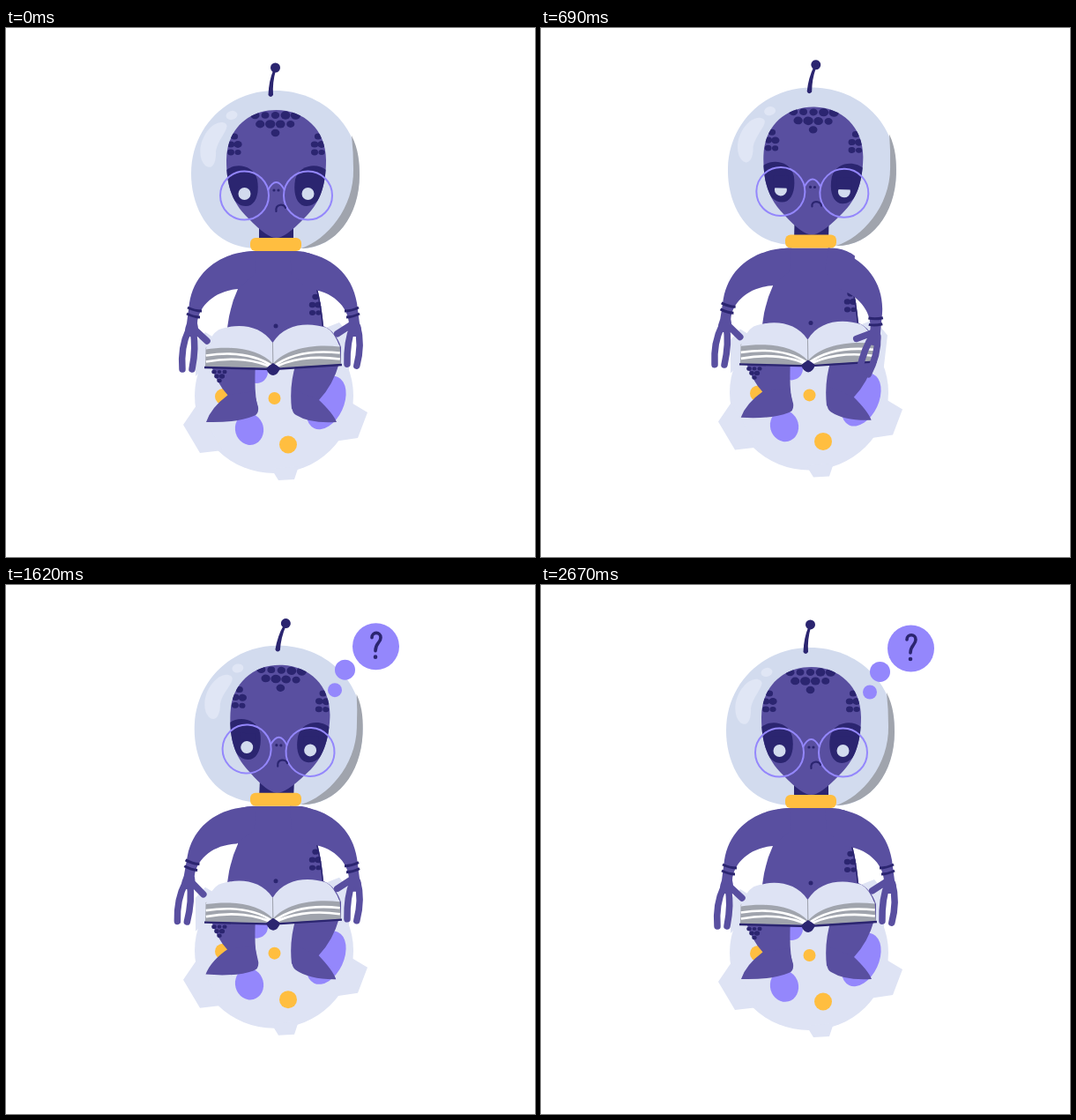
Animation, 600 px wide and 600 px high, one loop 2.7 s. Source, as an HTML page:

```html
<!DOCTYPE html>
<html>
<head>
<meta charset="utf-8">
<style>
  html, body { margin: 0; height: 100%; overflow: hidden; background: #fff; }
  svg { display: block; width: 100vw; height: 100vh; }
  .skin { fill: #594fa0; }
  .dark { fill: #2b2570; }
  .pale { fill: #dee3f4; }
  .glass { fill: #d2dbee; }
  .gray { fill: #a0a4ad; }
  .violet { fill: #9487fc; }
  .gold { fill: #ffbe40; }
  .line { fill: none; stroke: #2b2570; stroke-width: 3; }
  .round { stroke-linecap: round; }
  .finger { fill: none; stroke: #594fa0; stroke-width: 7.5; stroke-linecap: round; }
  .rim { fill: none; stroke: #9487fc; stroke-width: 2; }
  .sheets { fill: none; stroke: #fff; stroke-width: 2.6; }
</style>
</head>
<body>
<svg viewBox="0 0 600 600">
  <defs>
    <path id="skull" d="M250 150C250 115 275 93 306.500 93S363 115 363 150C363 181 355 200 338 216Q317 238 306.500 238T275 216C258 200 250 181 250 150"/>
    <path id="trunk" d="M280 253H330Q344 253 356 262L353 295Q358 315 360 338Q374 344 380 362V380H228V368Q231 350 251 340Q254 315 263 296L252 262Q262 254 280 253"/>
    <clipPath id="inSkull"><use href="#skull"/></clipPath>
    <clipPath id="inTrunk"><use href="#trunk"/></clipPath>
    <filter id="blur" x="-30%" y="-30%" width="160%" height="160%"><feGaussianBlur stdDeviation="2"/></filter>
  </defs>
  <g id="all">
    <g class="pale">
      <ellipse cx="304" cy="417" rx="90" ry="88"/>
      <path d="M216 428L201 450L220 482L246 479ZM390 424L410 436L399 465L372 469ZM301 500L309 513L327 512L332 497Z"/>
      <path d="M215 395V357L226 345L250 360ZM350 345L378 334L393 352L388 395Z"/>
    </g>
    <g class="violet">
      <ellipse cx="363" cy="425" rx="20" ry="32" transform="rotate(25 363 425)"/>
      <ellipse cx="276" cy="455" rx="16" ry="18" transform="rotate(-15 276 455)"/>
      <circle cx="284" cy="390" r="13"/>
    </g>
    <g class="gold">
      <circle cx="304.500" cy="420" r="7"/>
      <circle cx="320" cy="472.500" r="10"/>
      <circle cx="246" cy="418" r="9"/>
    </g>

    <g class="skin">
      <path d="M232 380Q238 402 252 417L262 432H286Q281 415 283 380ZM329 380Q321 405 324 432L350 430L355 422Q371 405 378 380Z"/>
      <path id="footL" d="M252 416Q232 431 227 447Q262 448 281 440Q287 438 286 430L281 412Z"/>
      <path id="footR" d="M354 421Q371 437 375 447Q345 449 329 439Q325 437 324 430L326 410Z"/>
    </g>
    <g class="dark" id="thighSpots"></g>

    <g id="head">
      <path class="glass" d="M305 71C360 71 401 112 401 165C401 210 375 250 335 250H285C235 250 210 208 210 165C210 112 252 71 305 71"/>
      <path class="gray" d="M392 122C400 138 401 153 401 167C401 212 375 249 335 250C364 240 395 204 394 160Q394 140 392 122"/>
      <path fill="#e0e6f5" d="M222 150C215 130 232 105 246 107C259 110 240 125 238 140C239 160 228 163 222 150"/>
      <ellipse cx="256" cy="99" rx="6.500" ry="5" fill="#e0e6f5" transform="rotate(-15 256 99)"/>
      <g id="antenna" class="dark">
        <path d="M297.500 76Q298 60 303.500 47L306 48Q302 62 303 76Q300 80 297.500 76"/>
        <circle cx="305.500" cy="45" r="5.500"/>
      </g>
      <path class="dark" d="M287 222H326V242H287Z"/>
      <use href="#skull" class="skin"/>
      <g class="dark" clip-path="url(#inSkull)" id="headSpots"></g>
      <g id="eye">
        <path class="dark" clip-path="url(#inSkull)" d="M248 163C256 153 280 153 285 172C288 190 282 202 272 202C260 202 250 187 248 163"/>
        <circle class="glass" cx="270.500" cy="188" r="7"/>
        <rect class="dark" id="lid" x="262" y="172" width="17"/>
        <circle class="dark" cx="304" cy="184" r="1.600"/>
        <circle class="rim" cx="270.500" cy="190" r="27.500"/>
      </g>
      <use href="#eye" transform="matrix(-1 0 0 1 613 0)"/>
      <path class="rim" d="M297 184Q306.500 166 316 184"/>
      <path id="mouth" class="line round" style="stroke-width:2.200"/>
    </g>

    <use href="#trunk" class="skin"/>
    <g class="dark" clip-path="url(#inTrunk)">
      <g id="sideSpots"></g>
      <path class="line" d="M353 295Q358 315 360 338"/>
    </g>
    <circle class="dark" cx="306" cy="338" r="2.500"/>
    <rect class="gold" x="277" y="238" width="58" height="15" rx="6"/>

    <path id="page" class="pale" filter="url(#blur)" d="M286 356Q290 328 314 299Q334 301 348 310Q331 330 328 356Z"/>

    <g transform="rotate(-1.100 303 385)">
      <g id="halfBook">
        <path class="gray" d="M227 361Q265 350 303 370V386L226 383Z"/>
        <path class="sheets" id="sheets"/>
        <path class="pale" d="M227 363Q233 346 242 341C262 334 289 335 303 357V381C288 364 258 359 227 363"/>
        <path class="line" style="stroke-width:2.400" d="M225 383.500L303 387"/>
      </g>
      <use href="#halfBook" transform="matrix(-1 0 0 1 606 0)"/>
      <path d="M303 357V383" stroke="#a0a4ad"/>
      <path class="dark" d="M303 380Q308 383 311 386Q308 394 303 394T295 386Q298 383 303 380"/>
    </g>

    <g id="armL">
      <g id="limb">
        <path class="skin" d="M284 253C246 253 214 274 208 312L205 335Q202 342 203 350H217Q219 343 217 335C218 316 236 298 263 296L282 280Z"/>
        <path class="line" d="M206 317Q214 321 222 321M205 324Q213 328 220 328"/>
      </g>
      <path id="hand" class="finger" d="M207 343Q198 362 200 387M212 343Q216 362 211 387M214 342L228 355"/>
    </g>
    <g id="armR">
      <use href="#limb" transform="matrix(-1 0 0 1 606 0)"/>
      <use href="#hand" transform="translate(0 -5) rotate(10 396 335) matrix(-1 0 0 1 607 0)"/>
    </g>

    <g class="violet">
      <circle id="dotS" cx="373" cy="121.500" r="8"/>
      <circle id="dotM" cx="384.500" cy="98.500" r="11.500"/>
      <g id="dotL">
        <circle cx="419.500" cy="72" r="26.500"/>
        <path class="line round" style="stroke-width:3.600" d="M415 62C415 55 425 55 425 62C425 68 419 68 419 77"/>
        <circle class="dark" cx="419" cy="84" r="2.300"/>
      </g>
    </g>
  </g>
</svg>
<script>
const LOOP = 2700;
const $ = id => document.getElementById(id);

// Centred rows of spots with slightly varied sizes.
function cluster(id, x, y, rows, gap, rise, size) {
  rows.forEach((count, row) => {
    for (let i = 0; i < count; i++) {
      const r = size * (0.92 + 0.12 * Math.sin(5 * i + 3 * row));
      const cx = x + (i - (count - 1) / 2) * gap;
      $(id).innerHTML += `<ellipse cx="${cx}" cy="${y + row * rise}" rx="${r}" ry="${r * 0.85}"/>`;
    }
  });
}
cluster('headSpots', 305.5, 99, [5, 4, 1], 11.5, 10, 5.5);
for (const side of [-1, 1]) cluster('headSpots', 306.5 + side * 47.5, 123, [1, 2, 2], 8, 9, 4.5);
cluster('sideSpots', 351, 305, [1, 2, 2], 7, 9, 4);
cluster('thighSpots', 242, 390, [3, 2, 1], 6, 5, 3);

$('sheets').setAttribute('d', [0, 1].map(i =>
  `M227 ${370 + 7 * i}C258 ${366 + 6 * i} 285 ${371 + 5 * i} 303 ${384 + 2 * i}`).join(''));

// Sine-eased value through [time, value] keys.
function track(t, ...keys) {
  if (t <= keys[0][0]) return keys[0][1];
  for (let i = 1; i < keys.length; i++) {
    const [t0, a] = keys[i - 1], [t1, b] = keys[i];
    if (t < t1) return a + (b - a) * (1 - Math.cos(Math.PI * (t - t0) / (t1 - t0))) / 2;
  }
  return keys[keys.length - 1][1];
}
const move = (id, value) => $(id).setAttribute('transform', value);
const turn = (id, angle, x, y) => move(id, `rotate(${angle} ${x} ${y})`);
const pop = (id, t, start, x, y) =>
  move(id, `translate(${x} ${y}) scale(${track(t, [start, 0], [start + 150, 1])}) translate(${-x} ${-y})`);

function draw(t) {
  const bob = track(t, [0, 0], [570, -4], [1170, 0], [1980, -4], [LOOP, 0]);
  const tilt = track(t, [150, 0], [1200, 1], [1560, 1], [2550, 0]);
  const lid = track(t, [180, 0], [390, 1], [1080, 1], [1200, 0]);

  move('all', `translate(0 ${bob})`);
  turn('head', 2.7 * tilt, 306, 245);
  turn('antenna', 4.8 * tilt, 300, 76);
  turn('armL', 2.7 * tilt, 265, 265);
  turn('footL', 3 * tilt, 285, 435);
  turn('footR', 3 * tilt, 325, 435);
  turn('armR', track(t, [60, 0], [450, 16], [510, 16], [1110, 0]), 325, 270);

  $('lid').setAttribute('height', 8 + 6 * lid);
  $('mouth').setAttribute('d', `M306.5 ${208 - 2 * lid}C305 199 316 199 317 ${204 + lid}`);

  turn('page', track(t, [330, 60], [570, -60]), 302, 352);
  $('page').style.display = t >= 330 && t < 570 ? '' : 'none';

  pop('dotS', t, 690, 373, 121.5);
  pop('dotM', t, 1200, 384.5, 98.5);
  pop('dotL', t, 1350, 419.5, 72);
}

const start = performance.now();
function tick() {
  draw((performance.now() - start) % LOOP);
  requestAnimationFrame(tick);
}
tick();
</script>
</body>
</html>
```
